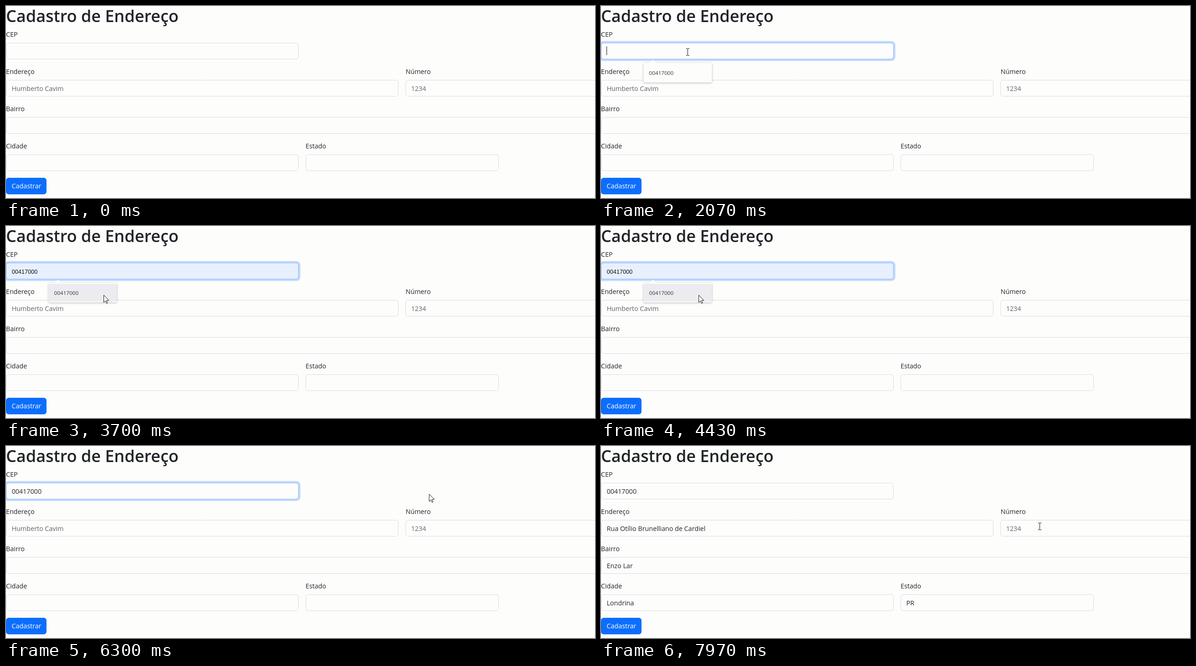
Write an HTML page with a canvas that moves like this. It is 1280 by 418 pixels and loops after 8 s.

```html
<!DOCTYPE html>
<html lang="pt-BR">
<head>
<meta charset="utf-8">
<title>Cadastro de Endereço</title>
<style>
html, body { margin: 0; width: 100%; height: 100%; overflow: hidden; background: #fdfdfc; }
canvas { display: block; width: 1280px; height: 418px; }
</style>
</head>
<body>
<canvas id="stage"></canvas>
<script>
const W = 1280, H = 418, LOOP = 8000;
const canvas = document.getElementById('stage');
const dpr = window.devicePixelRatio || 1;
canvas.width = W * dpr;
canvas.height = H * dpr;
const ctx = canvas.getContext('2d');

const SANS = '"Open Sans", "Noto Sans", sans-serif';
const BODY = '14.2px ' + SANS;
const PAPER = '#fdfdfc', INK = '#212529', HINT = '#606366', BORDER = '#d8dbe3';
const CEP = '00417000';

// Moments of the interaction, in ms
const FOCUS = 1700, POPUP = 1950, PREVIEW = 2700, PICK = 4450, BLUR = 7250, FILLED = 7600;
const FADE = 150, BLINK = 530;

const fields = {
  cep: [0, 80, 636],
  street: [0, 161, 853],
  number: [868, 161, 430],
  district: [0, 242, 1300],
  city: [0, 323, 636],
  state: [651, 323, 420]
};
const FIELD_H = 36;

const labels = [
  ['CEP', 0, 67], ['Endereço', 0, 148], ['Número', 868.5, 148],
  ['Bairro', 0, 229], ['Cidade', 0, 310], ['Estado', 651, 310]
];

// Pointer path: time, x, y
const path = [
  [350, 300, -22], [700, 240, 38], [1000, 183, 89], [1400, 183, 89],
  [1650, 186, 97], [2000, 186, 97], [2600, 234, 163], [2640, 234, 163],
  [3100, 212, 150], [5600, 212, 150], [5850, 893, 110], [6200, 920, 104],
  [6700, 913, 107], [7350, 913, 107], [7550, 938, 150], [7850, 953, 175]
];

const clamp = v => Math.max(0, Math.min(1, v));
const ease = v => v * v * (3 - 2 * v);

function pointerAt(t) {
  if (t < path[0][0]) return null;
  for (let i = 1; i < path.length; i++) {
    const [t0, x0, y0] = path[i - 1], [t1, x1, y1] = path[i];
    if (t < t1) {
      const k = ease((t - t0) / (t1 - t0));
      return [x0 + (x1 - x0) * k, y0 + (y1 - y0) * k];
    }
  }
  return path[path.length - 1].slice(1);
}

function text(str, x, y, color = INK, font = BODY) {
  ctx.font = font;
  ctx.fillStyle = color;
  ctx.fillText(str, x, y);
}

function box(x, y, w, h, r, fill, stroke) {
  ctx.beginPath();
  ctx.roundRect(x, y, w, h, r);
  if (fill) {
    ctx.fillStyle = fill;
    ctx.fill();
  }
  if (stroke) {
    ctx.strokeStyle = stroke;
    ctx.lineWidth = 1;
    ctx.stroke();
  }
}

function field([x, y, w], glow = 0, fill = PAPER) {
  if (glow > 0) {
    box(x - 3.8, y - 3.8, w + 7.6, FIELD_H + 7.6, 9, `rgba(13,110,253,${0.25 * glow})`);
  }
  box(x + 0.5, y + 0.5, w - 1, FIELD_H - 1, 5.2, fill, BORDER);
  if (glow > 0) {
    box(x + 0.5, y + 0.5, w - 1, FIELD_H - 1, 5.2, null, `rgba(134,183,254,${glow})`);
  }
}

function value(name, str, color, font) {
  const [x, y] = fields[name];
  text(str, x + 12.4, y + 23.5, color, font);
}

function caret(t) {
  if (t < FOCUS || t >= BLUR || (t >= PREVIEW && t < PICK)) return;
  const start = t < PICK ? FOCUS : PICK;
  if (Math.floor((t - start) / BLINK) % 2) return;
  ctx.fillStyle = '#111';
  ctx.fillRect(t < PICK ? 12 : 77, 88, 1, 19);
}

function popup(hover) {
  ctx.save();
  ctx.shadowColor = 'rgba(0,0,0,0.28)';
  ctx.shadowBlur = 4 * dpr;
  ctx.shadowOffsetY = dpr;
  box(92.5, 124, 148.5, 42.5, 3, PAPER);
  ctx.restore();
  ctx.beginPath();
  ctx.moveTo(105, 124.5);
  ctx.lineTo(113, 117);
  ctx.lineTo(121, 124.5);
  ctx.fillStyle = PAPER;
  ctx.fill();
  if (hover) box(92.5, 126, 148.5, 38.5, 0, '#ececf0');
  text(CEP, 104.5, 150, '#333639', '11.6px ' + SANS);
}

function arrow(x, y) {
  const shape = [[0, 0], [0, 16], [3.7, 12.5], [6.2, 18], [8.4, 17], [6, 11.6], [11, 11.4]];
  ctx.beginPath();
  shape.forEach(([dx, dy]) => ctx.lineTo(x + dx + 0.5, y + dy + 0.5));
  ctx.closePath();
  ctx.fillStyle = '#fff';
  ctx.fill();
  ctx.strokeStyle = '#111';
  ctx.lineWidth = 1;
  ctx.stroke();
}

function beam(x, y) {
  x = Math.round(x);
  y = Math.round(y);
  ctx.fillStyle = '#111';
  ctx.fillRect(x, y - 7, 1, 14);
  for (const dy of [-8, 7]) {
    ctx.fillRect(x - 3, y + dy, 3, 1);
    ctx.fillRect(x + 1, y + dy, 3, 1);
  }
}

function pointer(t) {
  const p = pointerAt(t);
  if (!p) return;
  const [x, y] = p;
  const overPopup = t >= POPUP && t < PICK && y > 123 && y < 167 && x > 92 && x < 242;
  const overField = Object.values(fields).some(([fx, fy, fw]) =>
    x >= fx && x < fx + fw && y >= fy && y < fy + FIELD_H);
  const overTitle = x < 372 && y > 0 && y < 46;
  if (!overPopup && (overField || overTitle)) beam(x, y);
  else arrow(x, y);
}

function draw(t) {
  ctx.setTransform(dpr, 0, 0, dpr, 0, 0);
  ctx.fillStyle = PAPER;
  ctx.fillRect(0, 0, W, H);

  text('Cadastro de Endereço', 0, 35, INK, '600 35.65px ' + SANS);
  labels.forEach(([str, x, y]) => text(str, x, y));

  const preview = t >= PREVIEW && t < PICK;
  const filled = t >= FILLED;
  const glow = ease(clamp((t - FOCUS) / FADE)) * (1 - ease(clamp((t - BLUR) / FADE)));
  for (const name in fields) {
    if (name === 'cep') field(fields.cep, glow, preview ? '#e8f0fe' : PAPER);
    else field(fields[name]);
  }

  if (preview) value('cep', CEP, '#111', '12.6px "Liberation Sans", Arial, sans-serif');
  else if (t >= PICK) value('cep', CEP);
  caret(t);

  value('number', '1234', HINT);
  if (filled) {
    value('street', 'Rua Otílio Brunelliano de Cardiel');
    value('district', 'Enzo Lar');
    value('city', 'Londrina');
    value('state', 'PR');
  } else {
    value('street', 'Humberto Cavim', HINT);
  }

  box(0, 374, 88, 36, 5.7, '#0d6efd');
  text('Cadastrar', 12.2, 397, '#fff');

  if (t >= POPUP && t < PICK) popup(preview);
  pointer(t);
}

const begin = performance.now();
function tick() {
  draw((performance.now() - begin) % LOOP);
  requestAnimationFrame(tick);
}
tick();
</script>
</body>
</html>
```
